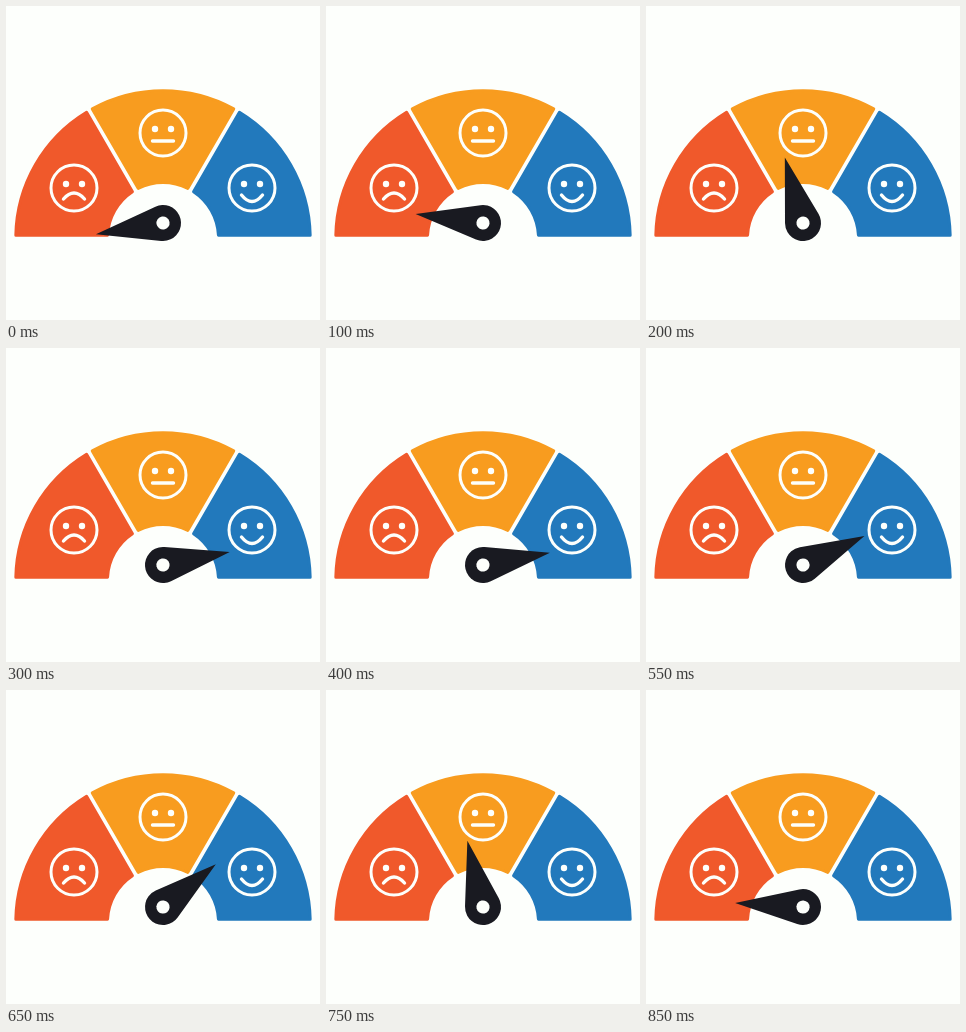
These frames come from a looping animation (314x314 px, 0.9 s). An HTML page with a canvas:

```html
<!DOCTYPE html>
<html lang="en">
<head>
<meta charset="utf-8">
<title>Mood gauge</title>
<style>
  html, body { margin: 0; width: 100%; height: 100%; overflow: hidden; background: #fdfffc; }
  canvas { display: block; width: 314px; height: 314px; }
</style>
</head>
<body>
<canvas id="stage" width="314" height="314"></canvas>
<script>
const ctx = document.getElementById("stage").getContext("2d");
const PAPER = "#fdfffc";
const INK = "#191a21";
const LOOP = 900;
const STEP = 50;
const RAD = Math.PI / 180;

// Needle poses: [time in ms, degrees clockwise from pointing left]
const poses = [[0, -9.5], [100, 7.5], [200, 74.5], [300, 169], [350, 173],
               [450, 163.7], [650, 141], [850, 3.4], [900, -9.5]];

const slope = i => (poses[i + 1][1] - poses[i][1]) / (poses[i + 1][0] - poses[i][0]);

// Harmonic mean of neighbouring slopes, flat at the turning points
function tangent(i) {
  if (i === 0 || i === poses.length - 1) return 0;
  const a = slope(i - 1), b = slope(i);
  return a * b > 0 ? 2 * a * b / (a + b) : 0;
}

function needleAngle(time) {
  let i = 0;
  while (time >= poses[i + 1][0]) i++;
  const [t0, a0] = poses[i], [t1, a1] = poses[i + 1];
  const span = t1 - t0, u = (time - t0) / span, v = 1 - u;
  return a0 * v * v * (1 + 2 * u) + a1 * u * u * (3 - 2 * u)
    + span * u * v * (tangent(i) * v - tangent(i + 1) * u);
}

function disc(x, y, r, color) {
  ctx.beginPath();
  ctx.arc(x, y, r, 0, Math.PI * 2);
  ctx.fillStyle = color;
  ctx.fill();
}

// Ring sector with parallel gaps and slightly rounded corners
function sector(from, to, startGap, endGap, color) {
  const outer = 147.2, inner = 55.5, round = 1.5;
  const start = r => from * RAD + Math.asin((startGap + round) / r);
  const end = r => to * RAD - Math.asin((endGap + round) / r);
  ctx.beginPath();
  ctx.arc(157, 232, outer, start(outer), end(outer));
  ctx.arc(157, 232, inner, end(inner), start(inner), true);
  ctx.closePath();
  ctx.fillStyle = ctx.strokeStyle = color;
  ctx.lineWidth = round * 2;
  ctx.lineJoin = "round";
  ctx.fill();
  ctx.stroke();
}

// bend > 0 smiles, bend < 0 frowns
function face(x, y, mouthY, bend) {
  ctx.strokeStyle = PAPER;
  ctx.lineWidth = 3;
  ctx.lineCap = "round";
  ctx.beginPath();
  ctx.arc(x, y, 23, 0, Math.PI * 2);
  ctx.stroke();
  disc(x - 8, y - 4, 3.2, PAPER);
  disc(x + 8, y - 4, 3.2, PAPER);
  ctx.lineWidth = 3.4;
  ctx.beginPath();
  ctx.moveTo(x - 10.5, y + mouthY);
  ctx.quadraticCurveTo(x, y + mouthY + bend, x + 10.5, y + mouthY);
  ctx.stroke();
}

function needle(angle) {
  const length = 68, r = 18, touch = Math.acos(r / length);
  ctx.save();
  ctx.translate(157, 217);
  ctx.rotate((angle + 180) * RAD);
  ctx.beginPath();
  ctx.moveTo(length, 0);
  ctx.arc(0, 0, r, touch, -touch);
  ctx.closePath();
  ctx.fillStyle = INK;
  ctx.fill();
  disc(0, 0, 6.6, PAPER);
  ctx.restore();
}

function draw(now) {
  const time = Math.floor(now % LOOP / STEP) * STEP;
  ctx.fillStyle = PAPER;
  ctx.fillRect(0, 0, 314, 314);
  sector(180, 240, 1.2, 1.8, "#f0592b");
  sector(240, 300, 1.8, 1.8, "#f89c1f");
  sector(300, 360, 1.8, 1.2, "#2279bc");
  face(68, 182, 11, -12);
  face(157, 127, 8, 0);
  face(246, 182, 7, 13);
  needle(needleAngle(time));
}

let origin = null;
function tick(now) {
  if (origin === null) origin = now;
  draw(Math.max(0, now - origin));
  requestAnimationFrame(tick);
}
draw(0);
requestAnimationFrame(tick);
</script>
</body>
</html>
```
